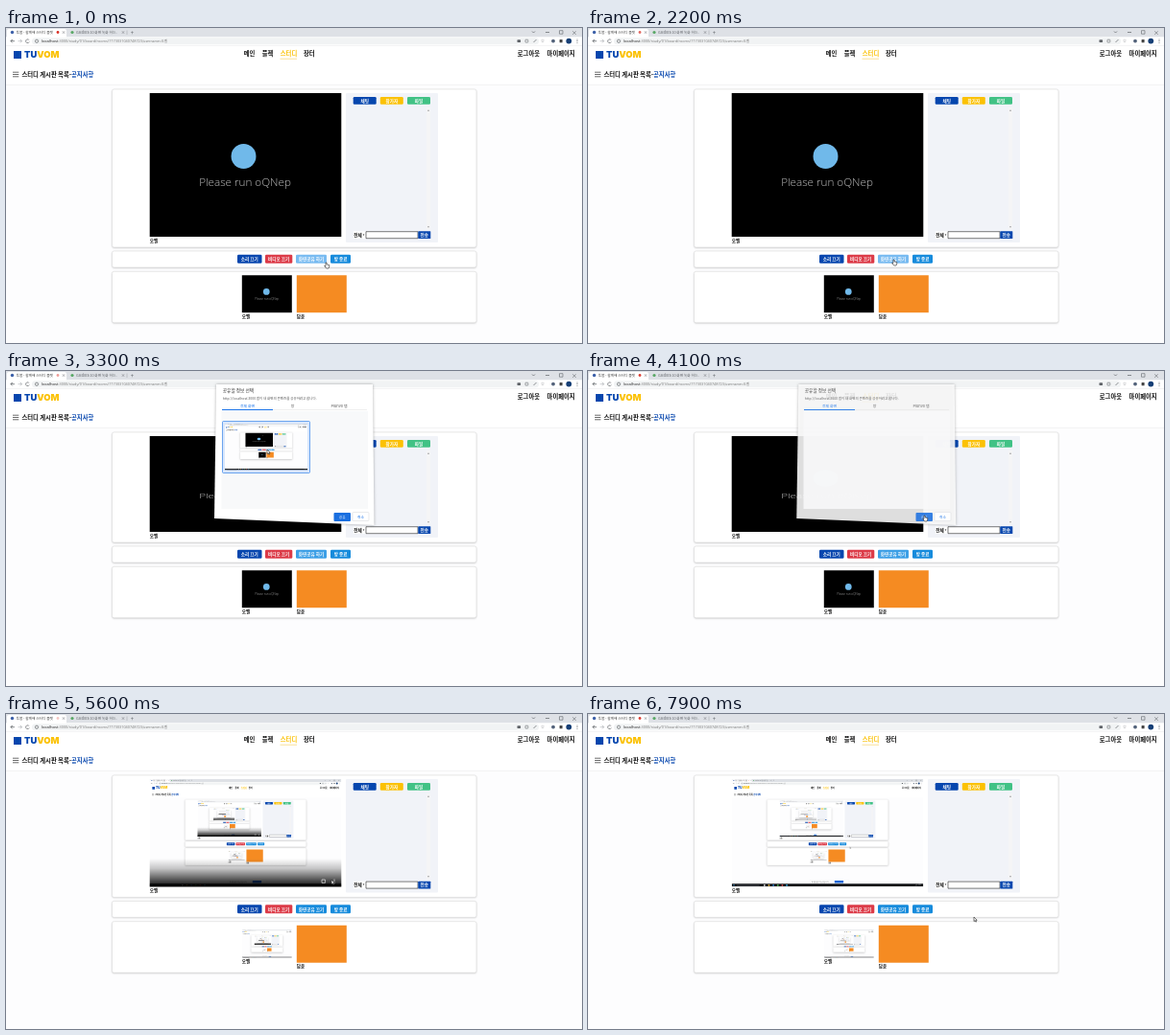
Write an HTML page with a canvas that moves like this. It is 600 px wide and 329 px high and loops after 8000 ms.

```html
<!DOCTYPE html>
<html lang="ko">
<head>
<meta charset="utf-8">
<title>Study room</title>
<style>
html, body { margin: 0; width: 100%; height: 100%; overflow: hidden; background: #fff; }
canvas { display: block; width: 600px; height: 329px; }
</style>
</head>
<body>
<canvas id="stage" width="600" height="329"></canvas>
<script>
const ctx = document.getElementById('stage').getContext('2d');
const LOOP = 8000, STEP = 100;
const BLUE = '#0646ae', YELLOW = '#fbc104', GREEN = '#41c285', RED = '#dc3b48', SKY = '#168bdc';
const ORANGE = '#f58b22', INK = '#111', GREY = '#5f6368';
const KR = '"Noto Sans CJK KR", "Noto Sans CJK", sans-serif';
const LATIN = '"Open Sans", sans-serif';
const SHRINK_AT = 2400, SHARE_AT = 4300;

// Pointer path: time, x, y
const PATH = [
  [0, 333, 245], [400, 333, 245], [500, 336, 244], [1000, 333, 244], [1900, 318, 242],
  [2600, 318, 242], [3150, 272, 82], [3300, 272, 82], [3800, 350, 151], [4300, 350, 151],
  [4900, 346, 166], [5500, 340, 173], [6300, 318, 176], [7000, 246, 206], [7300, 246, 206],
  [7700, 370, 213], [7900, 402, 212]
];

const clamp = v => Math.max(0, Math.min(1, v));
const ramp = (t, from, to) => clamp((t - from) / (to - from));

function box(x, y, w, h, fill, r = 0, stroke) {
  ctx.beginPath();
  ctx.roundRect(x, y, w, h, r);
  if (fill) { ctx.fillStyle = fill; ctx.fill(); }
  if (stroke) { ctx.strokeStyle = stroke; ctx.lineWidth = .6; ctx.stroke(); }
}

function dot(x, y, r, color) {
  ctx.beginPath();
  ctx.arc(x, y, r, 0, 7);
  ctx.fillStyle = color;
  ctx.fill();
}

function line(points, color, width = .7) {
  ctx.beginPath();
  points.forEach(([x, y]) => ctx.lineTo(x, y));
  ctx.strokeStyle = color;
  ctx.lineWidth = width;
  ctx.stroke();
}

function text(str, x, y, size, color = INK, weight = 400, align = 'left', family = KR) {
  ctx.font = `${weight} ${size}px ${family}`;
  ctx.fillStyle = color;
  ctx.textAlign = align;
  ctx.textBaseline = 'middle';
  ctx.fillText(str, x, y);
}

function button(label, x, y, w, h, color) {
  box(x, y, w, h, color, 1.3);
  text(label, x + w / 2, y + h / 2 + .1, 4.6, '#fff', 900, 'center');
}

function card(y, h) {
  ctx.save();
  ctx.shadowColor = 'rgba(0,0,0,.22)';
  ctx.shadowBlur = 2;
  ctx.shadowOffsetY = .7;
  box(110.5, y, 379.5, h, '#fff', 2);
  ctx.restore();
  box(110.5, y, 379.5, h, null, 2, '#dcdcdc');
}

function pointer([x, y], hand) {
  ctx.save();
  ctx.translate(x, y);
  ctx.beginPath();
  const shape = hand
    ? [[0, 0], [1, 0], [1.2, 2], [3.8, 2.6], [3.6, 5], [3, 6], [.6, 6], [-1.3, 3.4], [0, 3.4]]
    : [[0, 0], [0, 4.6], [1.1, 3.7], [1.9, 5.2], [2.6, 4.9], [1.9, 3.4], [3.2, 3.3]];
  shape.forEach(([px, py]) => ctx.lineTo(px, py));
  ctx.closePath();
  ctx.fillStyle = '#fff';
  ctx.fill();
  ctx.strokeStyle = '#222';
  ctx.lineWidth = .6;
  ctx.stroke();
  ctx.restore();
}

function pointerAt(t) {
  const next = PATH.findIndex(p => p[0] > t);
  if (next < 1) return PATH[next < 0 ? PATH.length - 1 : 0].slice(1);
  const [a, b] = [PATH[next - 1], PATH[next]];
  const k = ramp(t, a[0], b[0]), e = k * k * (3 - 2 * k);
  return [a[1] + (b[1] - a[1]) * e, a[2] + (b[2] - a[2]) * e];
}

function drawPointer(t) {
  const overButton = t < 3100 || (t >= 3700 && t < 4300) || (t >= 6900 && t < 7400);
  pointer(pointerAt(t), overButton);
}

function browser(t) {
  box(0, 0, 600, 9.5, '#dee1e6');
  box(1, 1, 62, 9, '#fff', [2, 2, 0, 0]);
  dot(6.5, 4.5, 1.7, '#3b5fa8');
  text('투봄 - 함께해 스터디 플랫', 10.5, 4.7, 3.7, '#444');
  ctx.globalAlpha = .6 + .4 * Math.cos(t * Math.PI / 500);
  dot(54, 4.5, 1.4, '#d93025');
  ctx.globalAlpha = 1;
  text('×', 60, 4.6, 4.5, GREY, 400, 'center');
  dot(69, 4.5, 1.6, '#58a765');
  text('Galdora 10 화면 녹화 하는..', 73, 4.7, 3.7, GREY);
  text('×', 122, 4.6, 4.5, GREY, 400, 'center');
  line([[126, 2.5], [126, 7]], '#9a9da2', .5);
  text('+', 131.5, 4.5, 6, GREY, 400, 'center');
  line([[548, 3.5], [549.5, 5], [551, 3.5]], GREY);
  line([[562, 4.5], [566, 4.5]], GREY);
  box(576.5, 2.7, 3.5, 3.5, null, 0, GREY);
  text('×', 592, 4.3, 6, GREY, 400, 'center');

  box(0, 9.5, 600, 9, '#fff');
  box(27, 10.3, 528, 7, '#f1f3f4', 3.5);
  line([[9, 13.7], [5, 13.7], [6.7, 12], [5, 13.7], [6.7, 15.4]], GREY);
  line([[12.5, 13.7], [16.5, 13.7], [14.8, 12], [16.5, 13.7], [14.8, 15.4]], '#b5b8bc');
  ctx.beginPath();
  ctx.arc(22.5, 13.7, 1.9, .4, 5.6);
  ctx.strokeStyle = GREY;
  ctx.lineWidth = .7;
  ctx.stroke();
  ctx.beginPath();
  ctx.arc(32, 13.7, 1.6, 0, 7);
  ctx.stroke();
  text('localhost', 37, 13.8, 4.2, '#222', 400, 'left', LATIN);
  const hostWidth = ctx.measureText('localhost').width;
  text(':3000/study/01/board/rooms/7173031040748723', 37 + hostWidth, 13.8, 3.8, '#777', 400, 'left', LATIN);
  const roomWidth = ctx.measureText(':3000/study/01/board/rooms/7173031040748723').width;
  text('/username=오벨', 37 + hostWidth + roomWidth, 13.8, 3.5, '#777');
  box(532.5, 12.3, 3.6, 2.6, GREY, .6);
  box(541, 12.2, 2.8, 2.8, null, .4, GREY);
  line([[549.5, 15], [552.5, 12]], GREY);
  text('☆', 559, 13.7, 5, GREY, 400, 'center', '"DejaVu Sans", sans-serif');
  dot(570, 13.6, 1.9, '#52627a');
  box(576.6, 12, 3, 3.2, '#444', .5);
  dot(586.3, 13.6, 2.9, '#153e75');
  [12, 13.6, 15.2].forEach(y => dot(595, y, .5, GREY));
  box(0, 18.3, 600, .5, '#e3e4e6');
}

function header() {
  box(8, 24, 8, 8, BLUE);
  text('TU', 19, 28.2, 9.4, BLUE, 900, 'left', 'Inter, sans-serif');
  const w = ctx.measureText('TU').width;
  text('VOM', 19 + w, 28.2, 9.4, YELLOW, 900, 'left', 'Inter, sans-serif');
  text('메인', 247.8, 27, 6.3, INK, 700);
  text('플젝', 266.8, 27, 6.3, INK, 700);
  text('스터디', 285.8, 27, 6.3, YELLOW, 700);
  box(285.5, 31.8, 17.5, .7, '#f6d36a');
  text('장터', 310, 27, 6.3, INK, 700);
  text('로그아웃', 532.8, 27, 6.3, INK, 700);
  text('마이페이지', 563.6, 27, 6.3, INK, 700);
  [46.2, 48.5, 50.8].forEach(y => line([[7, y], [13.3, y]], '#444', .8));
  const title = '스터디 게시판 목록-';
  text(title, 16.5, 48.3, 6.3, INK, 900);
  text('공지사항', 16.5 + ctx.measureText(title).width, 48.3, 6.3, BLUE, 900);
  box(0, 59, 600, .6, '#e9e9e9');
}

// Camera placeholder on a 200 x 150 picture
function camera(x, y, w, h) {
  ctx.save();
  ctx.translate(x, y);
  ctx.scale(w / 200, h / 150);
  box(0, 0, 200, 150, '#000');
  dot(98, 66, 13, '#70b9ea');
  text('Please run oQNep', 99.5, 94, 11.7, '#c2c2c2', 300, 'center', LATIN);
  ctx.restore();
}

// Whole desktop: page plus taskbar, 600 x 337.5
function screen(t, x, y, w, depth) {
  ctx.save();
  ctx.translate(x, y);
  ctx.scale(w / 600, w / 600);
  ctx.beginPath();
  ctx.rect(0, 0, 600, 337.5);
  ctx.clip();
  if (depth > 3) {
    box(0, 0, 600, 338, '#f2f2f3');
  } else {
    page(t, depth);
    if (t >= SHARE_AT) {
      box(245, 317, 122, 11, '#fff', 1, '#ddd');
      text('화면을 공유하는 중입니다.', 250, 322.5, 5, '#555');
      box(322, 318.5, 28, 8, '#1a66d6', 1);
    }
    drawPointer(t);
  }
  box(0, 328.5, 600, 9, '#101216');
  dot(7, 333, 2, '#4aa3df');
  box(15, 330, 72, 6, '#303237');
  ['#ddd', '#e3b341', '#2f80d0', '#4caf50', '#d9534f', '#3aa7d8'].forEach((c, i) =>
    box(100 + i * 14, 330.6, 5, 5, c, 1));
  text('오후 2:41', 592, 333, 4.5, '#ddd', 400, 'right');
  ctx.restore();
}

function mainVideo(t, depth, height) {
  if (t < SHARE_AT) {
    camera(149.7, 68, 199.6, height);
    return;
  }
  screen(t - 200, 149.7, 68, 199.6, depth + 1);
  const shade = ramp(t, 4300, 4600) * (1 - ramp(t, 6800, 7700));
  if (!shade) return;
  ctx.save();
  ctx.globalAlpha = shade;
  const fade = ctx.createLinearGradient(0, 151, 0, 180.5);
  fade.addColorStop(0, 'rgba(0,0,0,0)');
  fade.addColorStop(.35, 'rgba(0,0,0,.22)');
  fade.addColorStop(1, 'rgba(0,0,0,.95)');
  box(149.7, 151, 199.6, 29.4, fade);
  ctx.globalAlpha = ramp(shade, .6, 1);
  box(329, 173, 3.4, 3.4, null, 0, '#fff');
  [173, 174.8, 176.6].forEach(y => dot(342, y, .55, '#fff'));
  ctx.restore();
}

function chat(d) {
  box(354, 68, 96, 156 + d, '#f1f3f8', 1);
  button('채팅', 361.7, 72, 24, 7.8, BLUE);
  button('참가자', 389.8, 72, 24, 7.8, YELLOW);
  button('파일', 418, 72, 24, 7.8, GREEN);
  box(438, 83, 4, 127 + d, '#f5f5f6');
  text('▴', 440, 85.5, 4, '#a3a3a3', 400, 'center', '"DejaVu Sans", sans-serif');
  text('▾', 440, 207.5 + d, 4, '#a3a3a3', 400, 'center', '"DejaVu Sans", sans-serif');
  box(361.8, 212.3 + d, 13, 7.6, '#fff');
  text('전체', 362.3, 216.2 + d, 4.6, INK, 900);
  text('▾', 372.5, 216 + d, 3, INK, 400, 'center', '"DejaVu Sans", sans-serif');
  box(375, 212.7 + d, 54, 7, '#fff', 0, '#222');
  box(429.3, 212.3 + d, 13, 7.7, BLUE, .5);
  text('전송', 435.8, 216.2 + d, 4.6, '#fff', 900, 'center');
}

function page(t, depth) {
  const sharing = t >= SHARE_AT;
  const d = sharing ? -37.6 : t >= SHRINK_AT ? -50 : 0;
  box(0, 0, 600, 329, '#fdfdfe');
  browser(t);
  box(0, 18.8, 600, 40, '#fff');
  header();

  card(64, 165 + d);
  mainVideo(t, depth, 150 + d);
  text('오벨', 149.7, 221.8 + d, 4.6, INK, 900);
  chat(d);

  card(233 + d, 17);
  const by = 236.8 + d, hover = t < 2800;
  button('소리 끄기', 241, by, 25.5, 9, BLUE);
  button('비디오 끄기', 270, by, 28.3, 9, RED);
  button(sharing ? '화면공유 끄기' : '화면공유 하기', 302, by, 32, 9, hover ? '#78bbf1' : sharing ? SKY : '#3c9fe6');
  button('방 종료', 338, by, 21, 9, SKY);

  card(254.3 + d, 53.5);
  const ty = 258.3 + d;
  if (sharing) screen(t - 200, 245.8, 225.3, 52, depth + 1);
  else camera(245.8, ty, 52, 39);
  text('오벨', 245.8, sharing ? 258.7 : 301 + d, 4.6, INK, 900);
  box(302.8, ty, 52, 39, ORANGE);
  text('담윤', 302.8, 301 + d, 4.6, INK, 900);
}

function dialog(t) {
  const alpha = t < 3500
    ? clamp((t - 2400) / 180)
    : t <= 4000 ? 1 : t <= 4100 ? .87 : clamp((4300 - t) / 250);
  if (!alpha) return;
  const inset = 2 * (1 - alpha);
  ctx.save();
  ctx.globalAlpha = alpha;
  ctx.shadowColor = 'rgba(0,0,0,.35)';
  ctx.shadowBlur = 3;
  ctx.beginPath();
  [[219 + inset, 14], [382 - inset, 14], [383.5 - inset, 161], [217 + inset, 154]]
    .forEach(([x, y]) => ctx.lineTo(x, y));
  ctx.closePath();
  ctx.fillStyle = '#fff';
  ctx.fill();
  ctx.shadowColor = 'transparent';

  text('공유할 정보 선택', 225.8, 20.5, 4.7, '#333');
  text('http://localhost:3000 앱이 내 화면의 콘텐츠를 공유하려고 합니다.', 225.8, 28.2, 3.5, '#555');
  text('전체 화면', 251.5, 37, 3.9, '#1a73e8', 400, 'center');
  text('창', 298.5, 37, 3.9, '#555', 400, 'center');
  text('Plunvo 탭', 347, 37, 3.9, '#555', 400, 'center');
  box(225, 40.5, 151, .5, '#ddd');
  box(225, 40, 53, 1, '#1a73e8');
  box(224.5, 42, 152.5, 102, '#f8f9fa');

  const picked = t >= 3200;
  if (t < 4100) {
    if (picked) box(225.5, 52.5, 91, 54, '#d9e7fc', 1, '#1a73e8');
    // The nested page resets nothing, so it fades together with the dialog
    miniature(t, 228, 55, 86, alpha);
  }
  box(341.5, 148, 17.5, 9, picked ? '#1a6fe0' : '#e3e4e6', 1);
  text('공유', 350.2, 152.5, 3.8, picked ? '#fff' : '#999', 400, 'center');
  box(361, 147.5, 17, 9, '#fff', 1, picked ? '#dadce0' : '#5a9cf0');
  text('취소', 369.5, 152.2, 3.8, '#1a73e8', 400, 'center');
  ctx.restore();
}

function miniature(t, x, y, w, alpha) {
  if (alpha < .5) return;
  screen(Math.max(t - 200, SHRINK_AT), x, y, w, 1);
  if (alpha < 1) {
    ctx.globalAlpha = 1 - alpha;
    box(x, y, w, w * .5625, '#fff');
    ctx.globalAlpha = alpha;
  }
}

function frame(now) {
  const t = Math.floor((now % LOOP) / STEP) * STEP;
  ctx.globalAlpha = 1;
  page(t, 0);
  dialog(t);
  drawPointer(t);
  requestAnimationFrame(frame);
}
requestAnimationFrame(frame);
</script>
</body>
</html>
```
